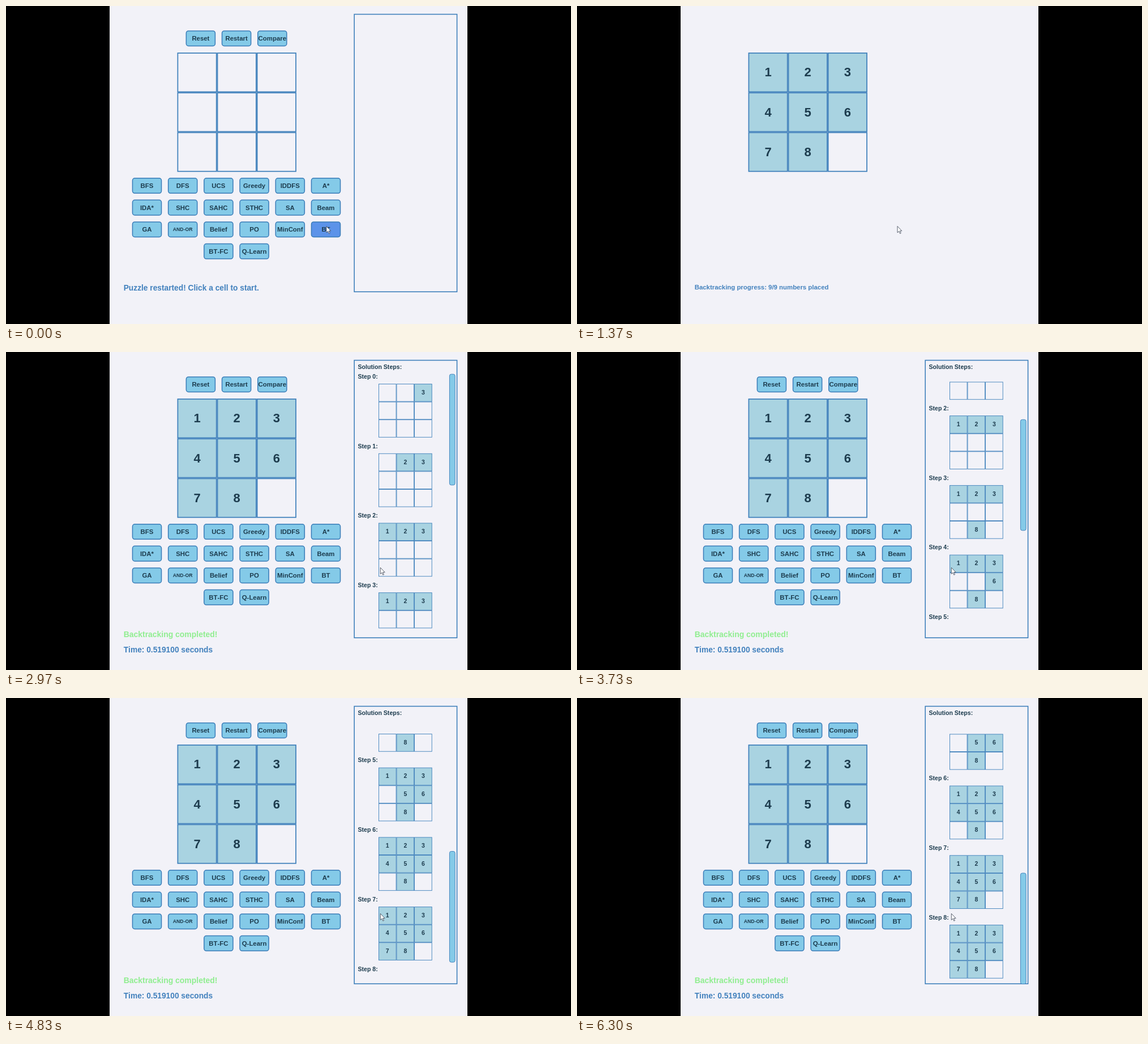
Recreate the animation shown at these times as an HTML page. Size 998 px wide and 561 px high, loop 6.33 s.

```html
<!DOCTYPE html>
<html lang="en">
<head>
<meta charset="utf-8">
<title>Backtracking puzzle</title>
<style>
  html, body { margin: 0; width: 100%; height: 100%; overflow: hidden; background: #000; }
  svg { display: block; width: 100%; height: 100%; }
  text {
    font-family: "Liberation Sans", Arial, sans-serif;
    font-weight: bold;
    font-kerning: none;
    fill: #1d3c4e;
  }
  .line { stroke: #3f80bb; fill: none; }
  .cell.full { fill: #a9d3e1; }
  .btn { fill: #84cae8; stroke: #3a7cb8; stroke-width: 1.5; }
  .btn.hover { fill: #5c93e9; }
  .blue { fill: #4281bd; }
  .green { fill: #90ee90; }
</style>
</head>
<body>
<svg id="stage" viewBox="0 0 998 561"></svg>
<script>
const LOOP = 6330, START = 900, STEP = 57.5, DONE = START + 519;
const K = 561 / 640;               // app pixels to stage pixels
const ORDER = [3, 2, 1, 8, 6, 5, 4, 7];
const MAX_SCROLL = 727.6 * K, NOTCH = 24 * K;
const stage = document.getElementById('stage');

function add(parent, tag, attrs = {}, text = '') {
  const el = document.createElementNS('http://www.w3.org/2000/svg', tag);
  for (const name in attrs) el.setAttribute(name, attrs[name]);
  el.textContent = text;
  parent.appendChild(el);
  return el;
}
const group = (parent = stage) => add(parent, 'g');
const show = (el, on) => { el.style.display = on ? '' : 'none'; };

function label(parent, str, x, midY, size, cls = '', anchor = 'start') {
  return add(parent, 'text', {
    x, y: midY + size * 0.36, 'font-size': size, class: cls, 'text-anchor': anchor
  }, str);
}

// Rectangle whose border lies inside its bounds
function box(parent, x, y, w, h, border, cls, r = 0) {
  return add(parent, 'rect', {
    x: x + border / 2, y: y + border / 2, width: w - border, height: h - border,
    rx: r, class: cls, 'stroke-width': border
  });
}

function button(parent, str, x, y, size = 11.4) {
  const rect = box(parent, x, y, 60 * K, 32 * K, 1.5, 'btn', 4);
  label(parent, str, x + 30 * K, y + 14, size, '', 'middle');
  return rect;
}

function cell(parent, n, x, y, side, border, size) {
  const rect = box(parent, x, y, side, side, border, 'line cell');
  const digit = label(parent, n, x + side / 2, y + side / 2 - 0.8, size, '', 'middle');
  return on => { rect.classList.toggle('full', on); show(digit, on); };
}

add(stage, 'rect', { x: 183, width: 632, height: 561, fill: '#f2f2f8' });

// Main board
const board = [];
for (let n = 1; n <= 9; n++) {
  const col = (n - 1) % 3, row = Math.floor((n - 1) / 3);
  board.push(cell(group(), n, 302.5 + col * 70.13, 82.2 + row * 70.13, 70.13, 1.75, 22));
}

// Buttons and side panel
const ui = group();
['Reset', 'Restart', 'Compare'].forEach((s, i) => button(ui, s, 317.6 + i * 63.2, 43.2));
const rows = [
  ['BFS', 'DFS', 'UCS', 'Greedy', 'IDDFS', 'A*'],
  ['IDA*', 'SHC', 'SAHC', 'STHC', 'SA', 'Beam'],
  ['GA', 'AND-OR', 'Belief', 'PO', 'MinConf', 'BT'],
  ['BT-FC', 'Q-Learn']
];
let active;
rows.forEach((names, r) => names.forEach((s, i) => {
  const x = 222.7 + (i + (r === 3 ? 2 : 0)) * 63.2;
  const rect = button(ui, s, x, 303 + r * 38.6, s === 'AND-OR' ? 8.7 : 11.4);
  if (s === 'BT') active = rect;
}));
box(ui, 614.4, 13.8, 183, 491.2, 1.6, 'line');

const history = group();
label(history, 'Solution Steps:', 621.5, 26, 10.6);
const list = group(history);
const parts = [];
for (let k = 0; k < 9; k++) {
  const y = 43 + k * 140 * K, side = 36 * K;
  parts.push({ el: label(list, `Step ${k}:`, 621.5, y, 10.55), top: y - 5, bottom: y + 5 });
  const placed = ORDER.slice(0, k + 1);
  for (let r = 0; r < 3; r++) {
    const el = group(list), top = y + 13.1 + r * side;
    for (let c = 0; c < 3; c++) {
      const n = r * 3 + c + 1;
      cell(el, n, 658 + c * side, top, side, 0.9, 10.5)(placed.includes(n));
    }
    parts.push({ el, top, bottom: top + side });
  }
}
const thumb = box(history, 783, 38.7, 10.6, 196.5, 0.9, 'btn', 3);
thumb.style.strokeWidth = 0.9;

// Messages
const ready = label(stage, 'Puzzle restarted! Click a cell to start.', 207.7, 497.5, 13.75, 'blue');
const progress = label(stage, '', 207.7, 496.2, 11.4, 'blue');
const result = group();
label(result, 'Backtracking completed!', 207.7, 497.5, 13.95, 'green');
label(result, 'Time: 0.519100 seconds', 207.7, 525.5, 13.75, 'blue');

const cursor = add(stage, 'path', {
  d: 'M0 0V11.3L2.6 8.9L4.5 13L6.2 12.2L4.4 8.3H7.9Z',
  fill: '#fff', stroke: '#333b4c', 'stroke-width': 0.8, 'stroke-linejoin': 'round'
});

// Linear interpolation over [time, value] pairs
function track(keys, t) {
  if (t <= keys[0][0]) return keys[0][1];
  for (let i = 1; i < keys.length; i++) {
    const [t0, a] = keys[i - 1], [t1, b] = keys[i];
    if (t < t1) return a + (b - a) * (t - t0) / (t1 - t0);
  }
  return keys[keys.length - 1][1];
}
const pointerX = [[1950, 566], [2100, 588.3], [2500, 661.3]];
const pointerY = [[1950, 388.5], [2100, 381.6], [2500, 380.3]];
const notches = [[3030, 0], [3730, 9.5], [4500, 20.5], [4830, 26.5], [5110, 31]];

function draw(t) {
  const running = t >= START && t < DONE, done = t >= DONE;
  const count = t < START ? 0 : Math.min(9, 1 + Math.floor((t - START) / STEP));
  const placed = ORDER.slice(0, count);
  board.forEach((fill, i) => fill(placed.includes(i + 1)));

  show(ui, !running);
  show(ready, t < START);
  show(progress, running);
  show(result, done);
  show(history, done);
  progress.textContent = `Backtracking progress: ${count}/9 numbers placed`;

  const x = track(pointerX, t), y = track(pointerY, t);
  cursor.setAttribute('transform', `translate(${x} ${y})`);
  active.classList.toggle('hover', x < 591.5);

  const scroll = Math.min(MAX_SCROLL, Math.floor(track(notches, t)) * NOTCH);
  list.setAttribute('transform', `translate(0 ${-scroll})`);
  thumb.setAttribute('transform', `translate(0 ${scroll * 0.423})`);
  for (const p of parts) show(p.el, p.top - scroll >= 37.5 && p.bottom - scroll <= 504);
}

const origin = performance.now();
function tick() {
  draw((performance.now() - origin) % LOOP);
  requestAnimationFrame(tick);
}
tick();
</script>
</body>
</html>
```
